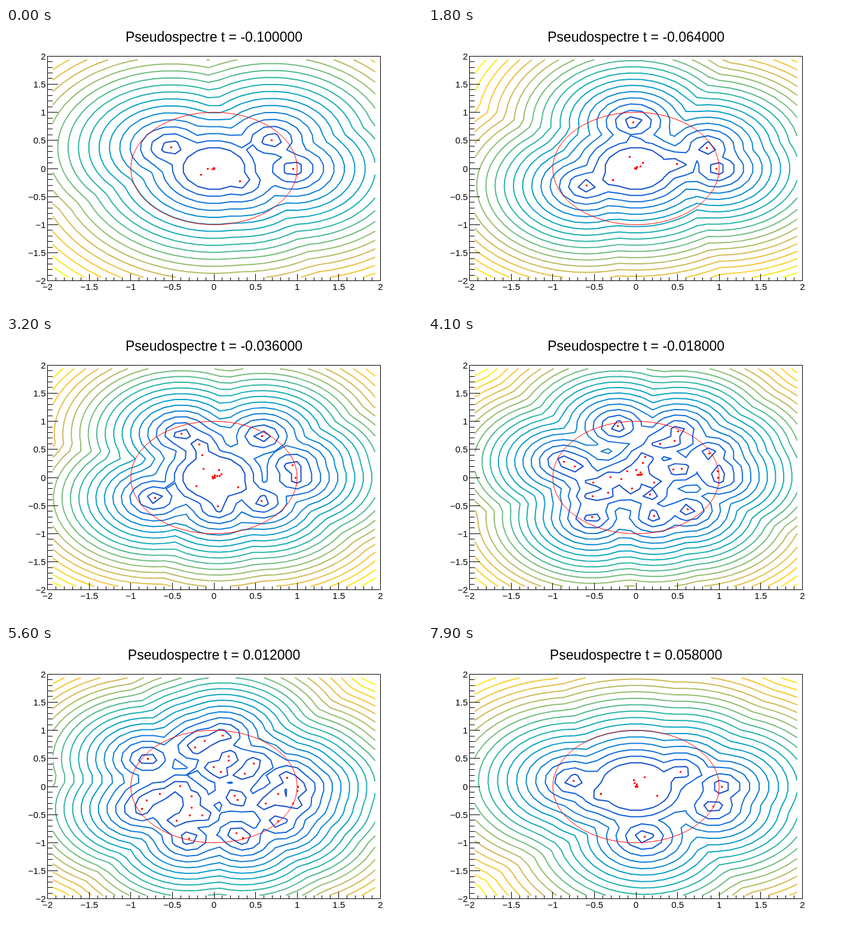
These frames come from a looping animation (696x472 px, 8 s). An HTML page with a canvas:

```html
<!DOCTYPE html>
<html lang="fr">
<head>
<meta charset="utf-8">
<title>Pseudospectre</title>
<style>
html, body { margin: 0; width: 100%; height: 100%; overflow: hidden; background: #fff; }
canvas { display: block; }
</style>
</head>
<body>
<canvas id="stage" width="696" height="472"></canvas>
<script>
const ctx = document.getElementById('stage').getContext('2d');
const FONT = '"Liberation Sans", Arial, sans-serif';
const STEPS = 80, STEP_MS = 100;
const GRID = 30, LEVELS = 20, MODES = 31;
const px = x => 348 + 139.2 * x;
const py = y => 236 - 94.4 * y;
const node = i => -2 + 4 * (i + 0.5) / GRID;

// Colour ramp from blue through green to yellow
const RED = [0.2082, 0.0592, 0.0780, 0.0232, 0.1802, 0.5301, 0.8186, 0.9956, 0.9764];
const GREEN = [0.1664, 0.3599, 0.5041, 0.6419, 0.7178, 0.7492, 0.7328, 0.7862, 0.9832];
const BLUE = [0.5293, 0.8684, 0.8385, 0.7914, 0.6425, 0.4662, 0.3499, 0.1968, 0.0539];

function ramp(u) {
  const s = u * 8, i = Math.min(7, Math.floor(s));
  const mix = c => Math.round(255 * (c[i] + (c[i + 1] - c[i]) * (s - i)));
  return `rgb(${mix(RED)},${mix(GREEN)},${mix(BLUE)})`;
}

function eigenvalues(t) {
  return Array.from({ length: MODES }, (_, n) => {
    const r = Math.sqrt(1 + t) * Math.exp(-10.1 * (n * t) ** 2);
    const a = -2 * Math.PI * n * n * t;
    return [r * Math.cos(a), r * Math.sin(a)];
  });
}

// Radius of the non-normal core around zero
function coreRadius(t) {
  const u = Math.min(1, Math.max(0, (Math.abs(t) - 0.017) / 0.015));
  return (0.29 + 0.4 * t) * u * u * (3 - 2 * u);
}

function sampleField(values, core) {
  const field = [];
  for (let j = 0; j < GRID; j++) {
    const row = [], y = node(j);
    for (let i = 0; i < GRID; i++) {
      const x = node(i);
      let d = core > 0 ? Math.max(0, Math.hypot(x, y) - core) : Infinity;
      for (const [a, b] of values) d = Math.min(d, Math.hypot(x - a, y - b));
      row.push(d);
    }
    field.push(row);
  }
  return field;
}

function traceLevel(field, z) {
  ctx.beginPath();
  for (let j = 0; j < GRID - 1; j++) {
    for (let i = 0; i < GRID - 1; i++) {
      const corners = [[i, j], [i + 1, j], [i + 1, j + 1], [i, j + 1]];
      const hits = [];
      corners.forEach(([ax, ay], k) => {
        const [bx, by] = corners[(k + 1) % 4];
        const a = field[ay][ax], b = field[by][bx];
        if ((a < z) === (b < z)) return;
        const u = (z - a) / (b - a);
        hits.push([px(node(ax + (bx - ax) * u)), py(node(ay + (by - ay) * u))]);
      });
      for (let k = 0; k < hits.length; k += 2) {
        ctx.moveTo(...hits[k]);
        ctx.lineTo(...hits[k + 1]);
      }
    }
  }
  ctx.stroke();
}

function drawContours(field) {
  const all = field.flat();
  const low = Math.min(...all), high = Math.max(...all);
  ctx.lineWidth = 2;
  ctx.lineCap = 'round';
  for (let i = 1; i < LEVELS; i++) {
    ctx.strokeStyle = ramp((i + 0.99) / LEVELS);
    traceLevel(field, low + (high - low) * i / LEVELS);
  }
}

function drawAxes() {
  ctx.strokeStyle = ctx.fillStyle = '#000';
  ctx.lineWidth = 1;
  ctx.lineCap = 'butt';
  ctx.strokeRect(69.5, 47.5, 557, 377);
  ctx.beginPath();
  for (let k = -20; k <= 20; k++) {
    const major = k % 5 === 0;
    const x = Math.floor(px(k / 10)) + 0.5, y = Math.floor(py(k / 10)) + 0.5;
    ctx.moveTo(x, 425);
    ctx.lineTo(x, major ? 413 : 419);
    ctx.moveTo(69, y);
    ctx.lineTo(major ? 87 : 78, y);
  }
  ctx.stroke();
  ctx.font = '15px ' + FONT;
  for (let k = -4; k <= 4; k++) {
    const label = String(k / 2).replace('-', '\u2212');
    ctx.textAlign = 'center';
    ctx.fillText(label, px(k / 2), 440);
    ctx.textAlign = 'right';
    ctx.fillText(label, 66.5, py(k / 2) + 5.5);
  }
}

function drawSpectrum(values) {
  ctx.strokeStyle = ctx.fillStyle = '#f00';
  ctx.lineWidth = 1;
  ctx.beginPath();
  ctx.ellipse(348, 236, 139.2, 94.4, 0, 0, 2 * Math.PI);
  ctx.stroke();
  for (const [x, y] of values) {
    ctx.fillRect(Math.floor(px(x)) - 1, Math.floor(py(y)) - 1, 3, 3);
  }
}

function draw(step) {
  const t = (2 * step - 100) / 1000;
  const values = eigenvalues(t);
  ctx.fillStyle = '#fff';
  ctx.fillRect(0, 0, 696, 472);
  drawContours(sampleField(values, coreRadius(t)));
  drawAxes();
  drawSpectrum(values);
  ctx.fillStyle = '#000';
  ctx.font = '23px ' + FONT;
  ctx.textAlign = 'center';
  ctx.fillText('Pseudospectre t = ' + t.toFixed(6), 348, 22.5);
}

const start = performance.now();
let shown = -1;
function tick() {
  const step = Math.floor((performance.now() - start) / STEP_MS) % STEPS;
  if (step !== shown) draw(shown = step);
  requestAnimationFrame(tick);
}
tick();
</script>
</body>
</html>
```
